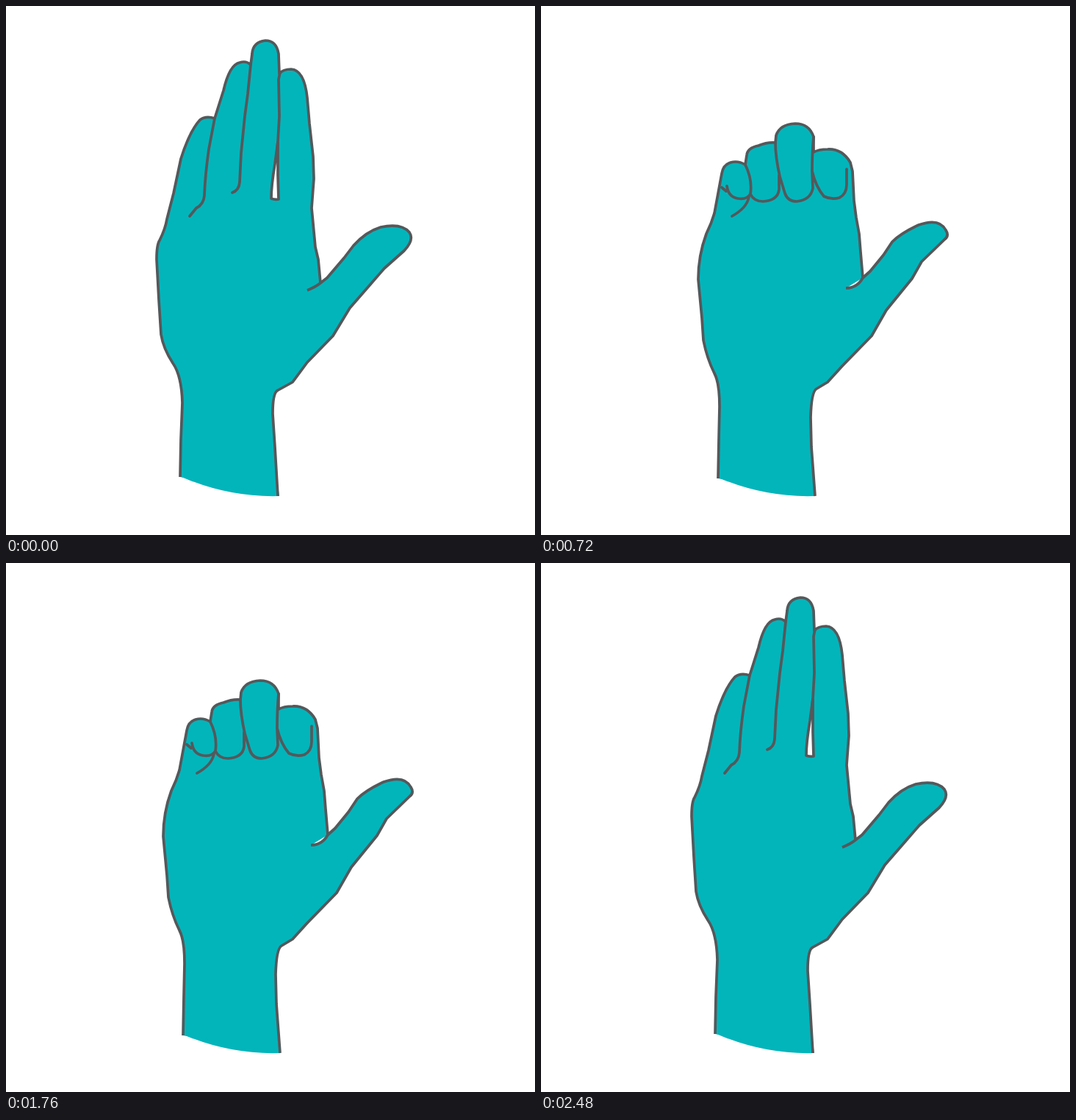
An HTML page without scripts that plays this animation: 720x720 px, repeating every 2560 ms.

```html
<!DOCTYPE html>
<html lang="en">
<head>
<meta charset="utf-8">
<title>Folding hand</title>
<style>
  html, body { margin: 0; width: 100%; height: 100%; overflow: hidden; background: #fff; }
  svg { display: block; width: 100%; height: 100%; }

  /* The hand folds in 16 held drawings, then unfolds through the same ones. */
  path { animation: 1280ms -5ms infinite alternate; }
  .skin { fill: #02b5bb; }
  .ink { stroke: #55585a; stroke-width: 3.7; stroke-linejoin: round; }
  .line { fill: none; stroke-linecap: round; }
  .outline { animation-name: outline; }
  .gap { fill: #fff; animation-name: gap, open; }
  .creases { animation-name: creases, open; }
  .folds { animation-name: folds, curl; }

  @keyframes outline {
    0% {
      d: path("M370,667 L366,600 363,555 Q363,526 370,523 L390,512 410,485 445,449 468,411 495,380 515,357 542,333 Q556,318 549,308 Q538,295 510,301 Q490,307 473,326 L460,343 437,370 428,377 L425,345 421,328 416,275 419,235 418,205 413,160 410,125 Q406,87 388,86 Q377,86 372,92 L371,65 Q368,47 353,47 Q336,49 335,65 L333,80 Q327,74 318,77 Q304,80 296,115 L284,153 Q272,149 264,155 Q250,170 238,208 L228,255 219,290 Q217,303 209,319 Q205,325 205,345 L208,400 211,447 Q214,466 227,486 Q239,503 240,540 L238,590 237,641 M428,377 Q422,382 410,387");
      animation-timing-function: steps(4);
    }
    25% {
      d: path("M373,667 L368,600 366,550 Q365,530 372,524 L388,514 407,494 436,464 466,420 496,384 516,359 544,333 Q556,321 549,311 Q536,294 510,307 Q492,315 477,330 L462,347 444,366 430,377 L429,345 429,320 421,280 420,235 417,195 413,165 411,130 Q406,83 387,83 Q377,84 372,90 L372,58 Q369,37 349,36 Q329,38 329,53 L328,71 Q320,66 309,70 Q299,73 297,95 L287,149 Q271,145 263,151 Q257,155 253,173 L237,232 226,280 Q222,296 213,318 Q207,335 208,355 L211,410 217,455 Q221,470 231,490 Q240,510 240,545 L240,590 239,641 M430,377 Q424,384 413,388");
      animation-timing-function: linear(0, 0 20%, .3 20%, .3 40%, .62 40%, .62 60%, .9 60%, .9 80%, .98 80%, .98 100%);
    }
    56.25% {
      d: path("M373,667 L368,600 367,560 Q368,525 375,521 L390,512 410,490 450,449 470,414 505,371 518,348 549,318 Q556,313 551,305 Q542,288 514,298 Q490,309 478,321 L466,339 448,361 438,370 L435,335 433,310 429,288 426,265 425,245 424,225 421,213 Q410,194 390,195 Q378,195 371,199 L371,178 Q365,160 346,160 Q325,161 320,176 L319,186 Q308,185 296,190 Q281,193 280,203 L278,216 Q268,210 258,213 Q248,216 246,228 L241,255 236,282 Q232,296 225,310 Q214,340 214,372 L219,425 221,455 Q226,480 236,500 Q243,513 243,545 L242,590 241,643 M438,370 Q430,384 415,384");
      animation-timing-function: steps(5);
    }
    87.5%, 100% {
      d: path("M373,667 L368,600 367,560 Q368,525 375,520 L397,503 430,468 457,440 467,421 508,368 517,350 549,319 Q556,312 550,302 Q544,291 517,299 Q497,305 486,315 L474,331 452,358 437,371 L434,325 431,303 426,288 422,275 424,255 423,235 420,220 Q412,203 397,195 Q385,198 369,199 L367,190 Q359,158 344,158 Q322,160 318,172 L308,192 Q299,189 280,190 Q273,197 267,210 L265,230 Q258,227 248,229 Q238,238 231,246 L226,270 222,293 Q217,308 213,330 Q211,340 211,370 L214,420 222,462 Q229,485 237,503 Q243,513 243,545 L242,590 241,643 M437,371 Q430,376 420,383");
    }
  }

  @keyframes creases {
    0% {
      d: path("M284,153 L276,195 Q271,230 270,258 Q269,270 259,275 L250,286 M333,80 L329,120 325,150 320,200 318,240 Q317,251 308,254 M373,90 L371,100 372,150 370,185 369,195");
      animation-timing-function: steps(4);
    }
    25% {
      d: path("M287,149 L287,190 Q280,225 279,255 Q280,271 267,280 L257,286 M328,71 L327,120 326,180 322,210 322,247 Q320,261 311,263 M372,90 L369,110 369,150 371,185 371,215");
      animation-timing-function: linear(0, 0 20%, .3 20%, .3 100%);
    }
    56.25%, 100% {
      d: path("M278,216 L284,236 Q285,250 283,260 Q281,273 270,280 L260,286 M319,186 L320,205 323,225 325,240 324,250 Q322,264 311,266 M371,199 L369,205 369,212 369,220 370,230");
    }
  }

  @keyframes gap {
    0% {
      d: path("M370,185 L366,215 Q361,245 361,262 Q366,264 371,263 L370,230 370,185");
      animation-timing-function: steps(4);
    }
    25% {
      d: path("M371,205 L371,225 Q365,240 365,255 Q366,268 374,268 L373,235 371,205");
      animation-timing-function: linear(0, 0 20%, .3 20%, .3 100%);
    }
    56.25%, 100% {
      d: path("M370,225 L370,235 Q369,245 369,255 Q369,262 371,262 L371,240 370,225");
    }
  }

  @keyframes folds {
    0%, 56.25% {
      d: path("M278,216 Q288,236 285,256 Q280,264 268,262 Q255,260 253,245 M246,247 L252,252 M283,260 Q280,275 260,286 M285,256 Q290,266 302,266 Q322,265 324,250 L324,230 M319,186 Q319,205 325,232 L332,255 Q336,266 348,266 Q367,264 370,248 M371,178 Q369,200 369,225 L370,248 M369,225 Q374,246 385,259 Q395,264 406,261 Q416,256 416,243 L416,222");
      animation-timing-function: steps(5);
    }
    87.5%, 100% {
      d: path("M265,230 Q268,255 276,284 Q275,306 258,308 Q245,309 237,285 L233,261 M233,261 L235,273 M276,284 Q276,291 274,297 M276,284 Q282,293 295,293 Q315,290 316,284 L309,232 M308,192 Q305,215 312,238 L324,270 Q327,284 345,284 Q363,284 366,265 M368,196 Q363,220 365,245 L366,265 M366,250 Q372,275 381,285 Q390,290 400,289 Q412,286 414,270 Q409,240 415,225");
    }
  }

  @keyframes open {
    0% { opacity: 1; animation-timing-function: step-end; }
    37.5%, 100% { opacity: 0; }
  }

  @keyframes curl {
    0% { opacity: 0; transform: translateY(-47px); animation-timing-function: step-end; }
    37.5% { opacity: 1; transform: translateY(-47px); animation-timing-function: step-end; }
    43.75% { opacity: 1; transform: translateY(-13px); animation-timing-function: step-end; }
    50% { opacity: 1; transform: translateY(-2px); animation-timing-function: step-end; }
    56.25% { opacity: 1; transform: none; animation-timing-function: step-end; }
    93.75%, 100% { opacity: 1; transform: translateY(2px); }
  }
</style>
</head>
<body>
<svg viewBox="0 0 720 720">
  <path class="skin" d="M239,641 Q303,669 372,667 L368,640z"/>
  <path class="skin ink outline"/>
  <path class="ink gap"/>
  <path class="ink line creases"/>
  <path class="ink line folds"/>
</svg>
</body>
</html>
```
